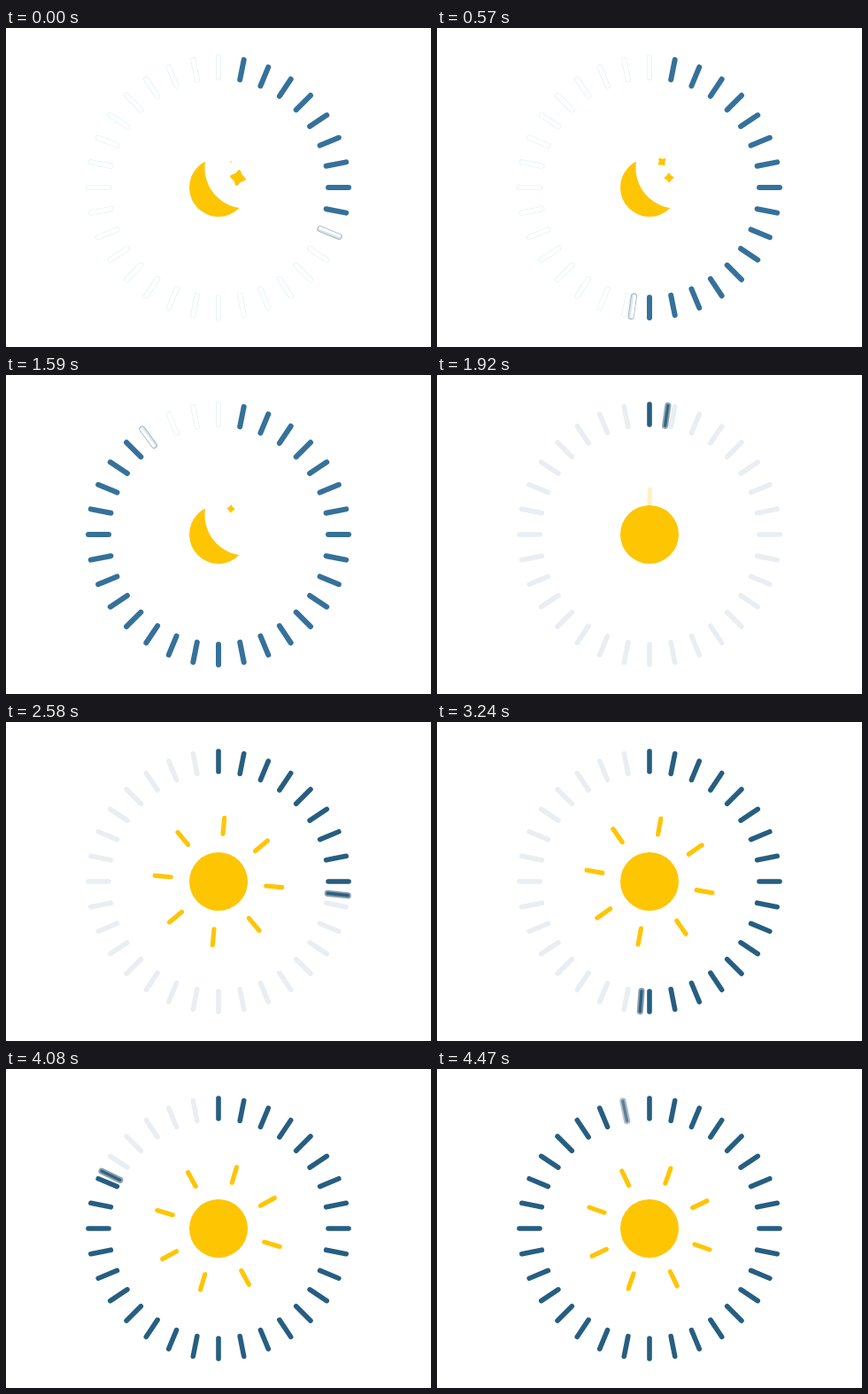
Write an HTML page with a canvas that moves like this. It is 480x360 px and loops after 4500 ms.

```html
<!DOCTYPE html>
<html>
<head>
<meta charset="utf-8">
<style>
html, body { margin: 0; width: 100%; height: 100%; overflow: hidden; background: #fff; }
canvas { display: block; }
</style>
</head>
<body>
<canvas id="stage" width="480" height="360"></canvas>
<script>
const ctx = document.getElementById('stage').getContext('2d');
const LOOP = 4500, STEP = 30, LAP = 2700, TICKS = 32;
const START = 9.97;
const DAWN = (TICKS - START) * LAP / TICKS;
const GOLD = '#fec503';

const clamp = (v, lo = 0, hi = 1) => Math.min(hi, Math.max(lo, v));

// Round-capped radial line; the angle runs clockwise from the top.
function spoke(angle, inner, outer, width, color, alpha = 1) {
  const s = Math.sin(angle), c = -Math.cos(angle);
  ctx.globalAlpha = alpha;
  ctx.lineCap = 'round';
  ctx.lineWidth = width;
  ctx.strokeStyle = color;
  ctx.beginPath();
  ctx.moveTo(s * inner, c * inner);
  ctx.lineTo(s * outer, c * outer);
  ctx.stroke();
  ctx.globalAlpha = 1;
}

function tick(index, width, color, alpha) {
  spoke(index * 2 * Math.PI / TICKS, 124, 147, width, color, alpha);
}

function disc(x, y, r, color) {
  ctx.fillStyle = color;
  ctx.beginPath();
  ctx.arc(x, y, r, 0, 2 * Math.PI);
  ctx.fill();
}

function star(x, y, size, angle) {
  if (size < 0.5) return;
  ctx.save();
  ctx.translate(x, y);
  ctx.rotate(angle);
  ctx.beginPath();
  for (let i = 0; i < 8; i++) {
    const r = i % 2 ? size * 0.55 : size;
    const a = i * Math.PI / 4;
    ctx.lineTo(r * Math.sin(a), -r * Math.cos(a));
  }
  ctx.closePath();
  ctx.lineJoin = 'round';
  ctx.lineWidth = size * 0.4;
  ctx.strokeStyle = ctx.fillStyle = GOLD;
  ctx.stroke();
  ctx.fill();
  ctx.restore();
}

function night(t, pos) {
  for (let i = 0; i < TICKS; i++) {
    if (i > 0 && pos - i > 0.7) {
      tick(i, 6, '#35719a');
    } else if (i === 0 || i > pos + 0.2) {
      tick(i, 6, '#d9eff3');
      tick(i, 4.8, '#fff');
    }
  }
  tick(pos, 7, '#9db2c0');
  tick(pos, 5.2, '#dbe4ea');
  tick(pos - 0.04, 3.2, '#fff');

  disc(0, 0, 33, GOLD);
  disc(30.4, -22.1, 45.9, '#fff');

  const phase = 2 * Math.PI * t / LAP;
  star(22, -11, 7.6 * clamp(0.47 + 0.53 * Math.cos(phase)), 0.2 + phase);
  star(14, -29, 6 * (0.5 - 0.5 * Math.cos(phase + 0.75)), phase - 2);
}

function day(t, pos) {
  for (let i = 0; i < TICKS; i++) {
    tick(i, 5.6, pos - i > 0.2 ? '#265e81' : '#e9eef2');
  }
  const strength = 0.55 + 0.45 * Math.sin(Math.PI * (pos % 1));
  tick(pos, 7.2, '#8b9ba6', strength);
  tick(pos, 3.4, '#285f82', strength);

  const turn = t / LAP * Math.PI / 9;
  for (let i = 0; i < 8; i++) {
    const grow = clamp((t - i * 65) / 250);
    if (grow > 0) {
      const outer = 44 + 28 * grow;
      spoke(turn + i * Math.PI / 4, outer - 18, outer, 5.2, GOLD, grow);
    }
  }
  disc(0, 0, 33, GOLD);
}

function frame() {
  const t = Math.floor((performance.now() % LOOP) / STEP) * STEP;
  const pos = START + t * TICKS / LAP;
  ctx.setTransform(1, 0, 0, 1, 0, 0);
  ctx.fillStyle = '#fff';
  ctx.fillRect(0, 0, 480, 360);
  ctx.translate(240, 180);
  if (t < DAWN) night(t, pos);
  else day(t - DAWN, pos - TICKS);
  requestAnimationFrame(frame);
}
frame();
</script>
</body>
</html>
```
